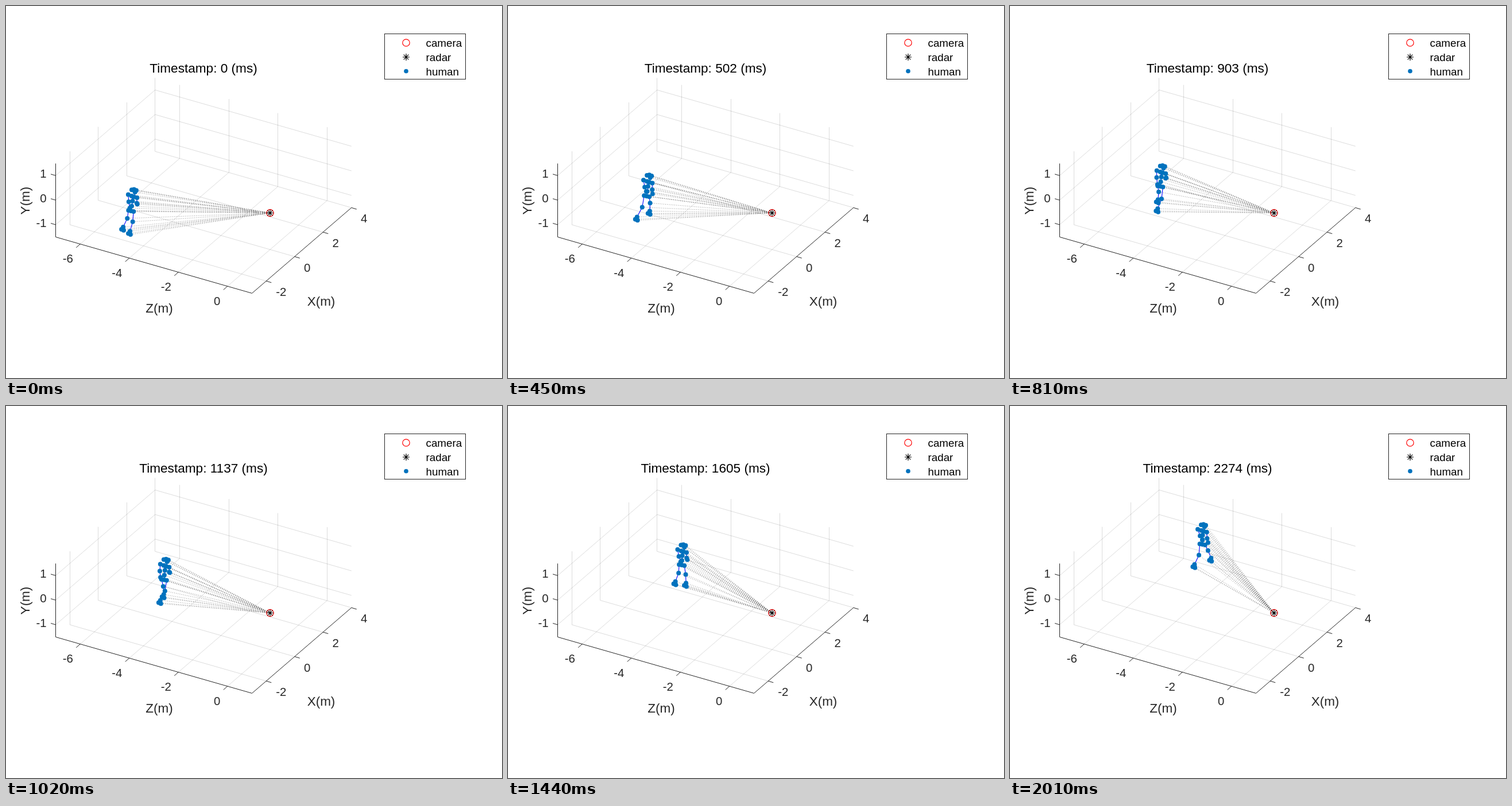
Write an HTML page that moves like this. It is 864 px wide and 648 px high and loops after 2040 ms.

```html
<!DOCTYPE html>
<html lang="en">
<head>
<meta charset="utf-8">
<title>Radar walk plot</title>
<style>
  html, body { margin: 0; width: 100%; height: 100%; overflow: hidden; background: #fff; }
  svg { display: block; width: 864px; height: 648px; font-family: "Liberation Sans", Arial, sans-serif; }
  text { fill: #262626; font-size: 20.4px; text-anchor: middle; }
  .label { font-size: 22.5px; }
  .title { font-size: 22.6px; fill: #000; }
  .key { font-size: 18.8px; fill: #000; text-anchor: start; }
  path, rect, circle { fill: none; }
  #grid { stroke: #262626; stroke-opacity: .16; }
  #axes, .frame { stroke: #262626; }
  #rays { stroke: #666; stroke-width: .75; stroke-dasharray: 1 2.2; }
  #bones { stroke: #00f; stroke-width: 1.1; }
  .dot { fill: #0072bd; }
  .ring { stroke: #f00; stroke-width: 1.2; }
  .star { stroke: #000; stroke-width: 1.2; }
</style>
</head>
<body>
<svg viewBox="0 0 864 648">
  <path id="grid"/>
  <path id="axes"/>
  <g id="labels"></g>
  <text id="title" class="title" x="344" y="116.3"></text>
  <path id="rays"/>
  <path id="bones"/>
  <g id="joints"></g>
  <g id="markers"></g>
</svg>
<script>
const LOOP = 2040, STEP = 30, MS_PER_SAMPLE = 33.445, LAST = 68;
const STRIDE = 24.5; // samples per full stride
const RADAR = [460, 360.5];
const byId = id => document.getElementById(id);

function add(parent, tag, attrs, content = '') {
  const node = document.createElementNS('http://www.w3.org/2000/svg', tag);
  for (const name in attrs) node.setAttribute(name, attrs[name]);
  node.textContent = content;
  parent.appendChild(node);
  return node;
}
const poly = (...points) => 'M' + points.map(p => p[0].toFixed(2) + ' ' + p[1].toFixed(2)).join('L');
const shift = (p, dx, dy) => [p[0] + dx, p[1] + dy];

// Projection of metres to the stage; the floor lies at y = -1.5.
const project = (x, y, z) => [
  502.75 + 24.75 * x + 42.75 * (z - 1),
  436.5 - 21.3 * x + 12.25 * (z - 1) - 42.8 * (y + 1.5)
];

function drawAxes() {
  const grid = [], axes = [], labels = byId('labels');
  const text = (p, s) => add(labels, 'text', { x: p[0], y: p[1] }, s);
  const upright = p => {
    const foot = [Math.floor(p[0]) + .5, p[1]];
    return poly(foot, shift(foot, 0, -128));
  };
  for (const x of [-2, 0, 2, 4]) {
    const edge = project(x, -1.5, 1), far = project(x, -1.5, -7);
    grid.push(poly(edge, far), upright(far));
    axes.push(poly(edge, shift(edge, 9, 2.7)));
    text(shift(edge, x < 0 ? 26 : 22, 26), x);
  }
  for (const z of [-6, -4, -2, 0]) {
    const edge = project(-3, -1.5, z), far = project(4, -1.5, z);
    grid.push(poly(edge, far), upright(far));
    axes.push(poly(edge, shift(edge, -7, 6.2)));
    text(shift(edge, z < 0 ? -21.5 : -18, 32.5), z);
  }
  for (const y of [-1, 0, 1]) {
    const edge = project(-3, y, -7);
    grid.push(poly(edge, project(4, y, -7), project(4, y, 1)));
    axes.push(poly(edge, shift(edge, -8.5, -2.5)));
    text(shift(edge, y < 0 ? -25 : -21.5, 4), y);
  }
  const left = project(-3, -1.5, -7);
  axes.push(upright(left), poly(left, project(-3, -1.5, 1), project(4, -1.5, 1)));
  byId('grid').setAttribute('d', grid.join(''));
  byId('axes').setAttribute('d', axes.join(''));
  const name = (attrs, s) => add(labels, 'text', { class: 'label', ...attrs }, s);
  name({ x: 267, y: 534 }, 'Z(m)');
  name({ x: 549, y: 521.5 }, 'X(m)');
  name({ transform: 'translate(41 339) rotate(-90)' }, 'Y(m)');
}

function drawMarkers() {
  const group = byId('markers');
  const ring = (cx, cy) => add(group, 'circle', { class: 'ring', cx, cy, r: 6.2 });
  const star = (x, y) => add(group, 'path', {
    class: 'star',
    d: `M${x - 6} ${y}h12M${x} ${y - 6}v12M${x - 4.3} ${y - 4.3}l8.6 8.6M${x - 4.3} ${y + 4.3}l8.6 -8.6`
  });
  ring(...RADAR);
  star(...RADAR);
  add(group, 'rect', { class: 'frame', x: 659.5, y: 48.5, width: 141, height: 79 });
  ring(697, 64);
  star(697, 89);
  add(group, 'circle', { class: 'dot', cx: 697, cy: 113.5, r: 3.8 });
  ['camera', 'radar', 'human'].forEach((s, i) =>
    add(group, 'text', { class: 'key', x: 731.5, y: 71 + 25 * i }, s));
}

// Nearly straight walk with a slow sideways drift and a bob once per stride.
function headAt(s) {
  const u = s / LAST, turn = 2 * Math.PI * s / STRIDE;
  return [
    223 + 113 * u - 2.5 * Math.sin(2 * Math.PI * u) - Math.sin(turn),
    319.5 - 111 * u + 2.3 * Math.sin(turn) + 1.2 * Math.sin(Math.PI * u)
  ];
}

function bodyAt(s) {
  const head = headAt(s);
  const shrink = 1.04 - .0011 * s, lean = .18 * (s - LAST / 2);
  const at = (x, y) => shift(head, x + lean * (y / 68) ** 2, y * shrink);

  // A joint swings about its rest place along the walk; the sides alternate.
  const turn = 2 * Math.PI * s / STRIDE;
  const swing = (side, x, y, reach, rise) => at(
    x + side * reach * Math.sin(turn - .15),
    y - side * rise * Math.sin(turn + .25));
  const arm = (side, elbow, wrist) => [swing(side, ...wrist), swing(side, ...elbow)];
  const leg = (side, hip, kneeX, kneeY, ankleX, ankleY) => {
    const ankle = swing(side, ankleX, ankleY, 10.5, 8);
    return [hip, swing(side, kneeX, kneeY, 4, 6), ankle, shift(ankle, -3, 4), shift(ankle, .8, 5.8)];
  };

  const face = [at(-4, .8), at(0, 0), at(4, 1.6), at(1.7, 4.5)];
  const neck = at(-4, 11), chest = at(.3, 12.5);
  const shoulders = [at(-10, 8.7), at(5.5, 14)];
  const trunk = [at(-2, 19.5), at(-3, 28), at(-3.5, 36)];
  const armL = arm(1, [-9, 20.7, -2.5, 0], [-6.7, 30.5, -4, -3]);
  const armR = arm(-1, [5.5, 23.5, 0, -2], [6.5, 26.5, 0, -7]);
  const legL = leg(1, at(-8, 35.2), -8, 50, -12, 65);
  const legR = leg(-1, at(1, 37), 1, 52.7, -2, 68);
  return {
    joints: [...face, neck, chest, ...shoulders, ...trunk, ...armL, ...armR, ...legL, ...legR],
    bones: [
      [face[3], chest, ...trunk],
      [...armL, shoulders[0], neck, trunk[0]],
      [...armR, shoulders[1], chest],
      [trunk[2], ...legL],
      [trunk[2], ...legR]
    ]
  };
}

drawAxes();
drawMarkers();
const dots = bodyAt(0).joints.map(() => add(byId('joints'), 'circle', { class: 'dot', r: 4 }));

function render(time) {
  const tick = Math.floor((time % LOOP) / STEP);
  const sample = tick < 63 ? tick : tick + 1; // one sample is skipped near the end
  const { joints, bones } = bodyAt(sample);
  byId('title').textContent = `Timestamp: ${Math.round(sample * MS_PER_SAMPLE)} (ms)`;
  byId('rays').setAttribute('d', joints.map(p => poly(RADAR, p)).join(''));
  byId('bones').setAttribute('d', bones.map(b => poly(...b)).join(''));
  joints.forEach((p, i) => {
    dots[i].setAttribute('cx', p[0].toFixed(2));
    dots[i].setAttribute('cy', p[1].toFixed(2));
  });
}

const start = performance.now();
function loop() {
  render(performance.now() - start);
  requestAnimationFrame(loop);
}
loop();
</script>
</body>
</html>
```
